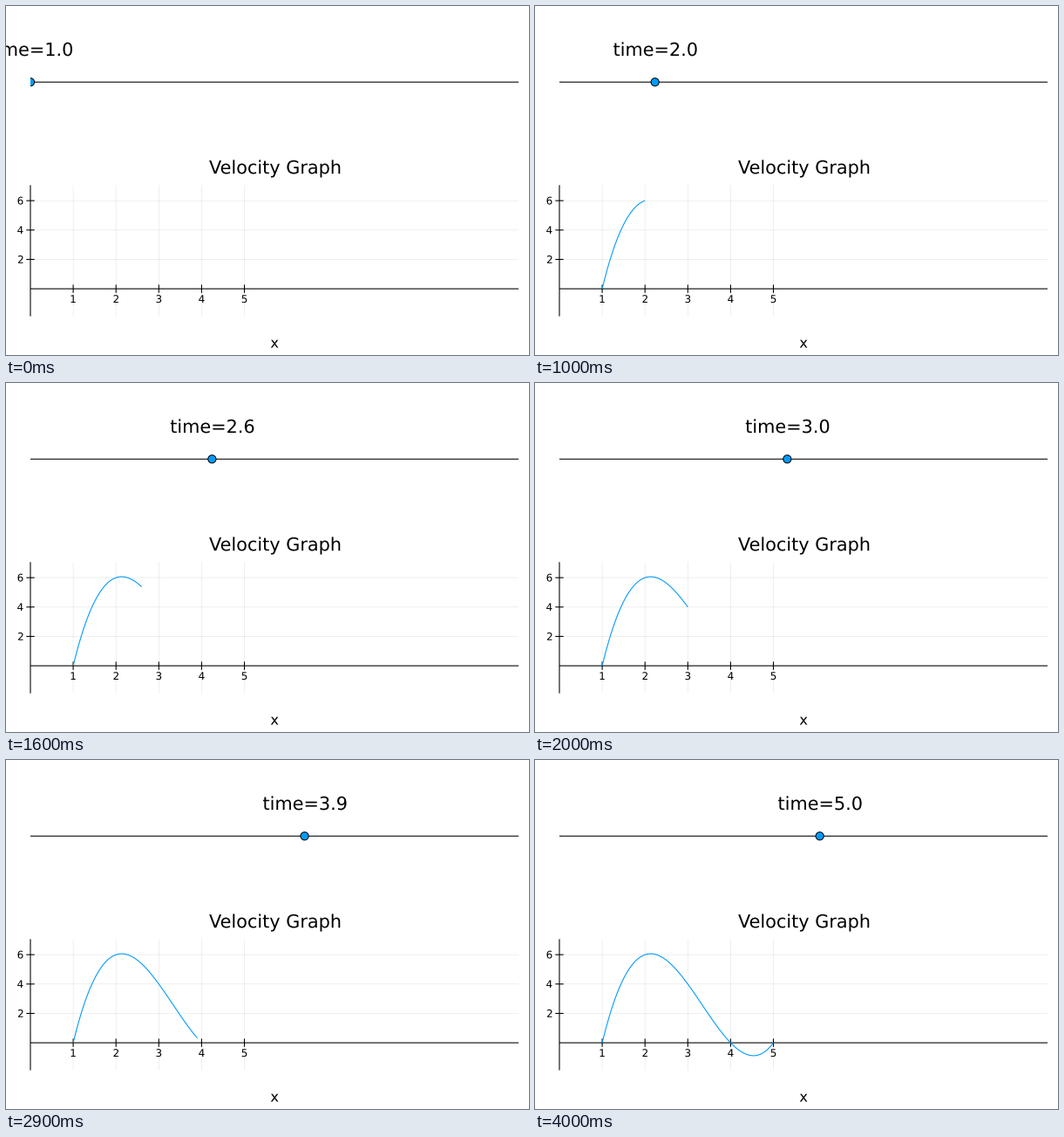
Write a matplotlib script that moves like this. It is 600 px wide and 400 px high and loops after 4100 ms.

```python
import numpy as np
import matplotlib.pyplot as plt
from matplotlib.animation import FuncAnimation
from matplotlib.patches import Circle, PathPatch, Rectangle
from matplotlib.textpath import TextPath
from matplotlib.transforms import Affine2D

WIDTH, HEIGHT, DPI = 600, 400, 100
STEPS, STEP_MS = 41, 100
PX = 72 / DPI                       # points per pixel
LEFT, RIGHT = 28, 588
TOP, BOTTOM = 205.3, 355.6
TRACK_Y, ZERO_Y = 87.2, 324.1
TRACK_UNIT = 28                     # pixels per unit of position
T_UNIT, V_UNIT = 49.1, 16.83        # pixels per unit of time and velocity
TITLE, LABEL, TICK = 20.8, 16.3, 11.9
TICK_HALF = 4.7
BLUE = "#009afa"

plt.rcParams["font.family"] = "DejaVu Sans"


def velocity(t):
    return (t - 1) * (t - 4) * (t - 5)


def position(t):
    def integral(u):
        return u**4 / 4 - 10 * u**3 / 3 + 29 * u**2 / 2 - 20 * u
    return integral(t) - integral(1)


fig = plt.figure(figsize=(WIDTH / DPI, HEIGHT / DPI), dpi=DPI, facecolor="white")
ax = fig.add_axes([0, 0, 1, 1])
ax.set_xlim(0, WIDTH)
ax.set_ylim(HEIGHT, 0)
ax.axis("off")


def segment(x0, y0, x1, y1, width=1.08, alpha=1.0, z=2):
    ax.plot([x0, x1], [y0, y1], color="black", lw=width * PX, alpha=alpha,
            solid_capstyle="butt", snap=False, zorder=z)


def grid(x0, y0, x1, y1):
    segment(x0, y0, x1, y1, width=0.6, alpha=0.1, z=1)


def text_path(text, x, baseline, size, align="center"):
    """Glyph outlines whose ink is centred on x, or ends there."""
    path = TextPath((0, 0), text, size=size)
    box = path.get_extents()
    anchor = box.x1 if align == "right" else (box.x0 + box.x1) / 2
    place = Affine2D().translate(-anchor, 0).scale(1, -1).translate(x, baseline)
    return place.transform_path(path)


def label(*args, **kwargs):
    patch = PathPatch(text_path(*args, **kwargs), fc="black", lw=0,
                      snap=False, zorder=5)
    return ax.add_patch(patch)


# Track
segment(LEFT, TRACK_Y, RIGHT, TRACK_Y)

# Velocity graph
for v in (2, 4, 6):
    y = ZERO_Y - v * V_UNIT
    grid(LEFT, y, RIGHT, y)
    segment(LEFT - TICK_HALF, y, LEFT + TICK_HALF, y)
    label(str(v), 19.5, y + 4.3, TICK, align="right")
for t in range(1, 6):
    x = LEFT + t * T_UNIT
    grid(x, TOP, x, BOTTOM)
    segment(x, ZERO_Y - TICK_HALF, x, ZERO_Y + TICK_HALF)
    label(str(t), x, 340, TICK)
segment(LEFT, ZERO_Y, RIGHT, ZERO_Y)
segment(LEFT, TOP, LEFT, BOTTOM)
label("Velocity Graph", 308.2, 192.2, TITLE)
label("x", 308.1, 391.6, LABEL)

# Moving parts
curve, = ax.plot([], [], color=BLUE, lw=1.08 * PX, solid_capstyle="butt",
                 snap=False, zorder=4)
caption = label("time=1.0", LEFT, 57.1, TITLE)
ball = Circle((LEFT, TRACK_Y), 4.6, fc=BLUE, ec="black", lw=PX, zorder=4)
ax.add_patch(ball)
ball.set_clip_path(Rectangle((LEFT, 0), RIGHT - LEFT, HEIGHT, transform=ax.transData))


def update(i):
    now = 1 + i / 10
    t = np.linspace(1, now, 4 * i + 1)
    curve.set_data(LEFT + t * T_UNIT, ZERO_Y - velocity(t) * V_UNIT)
    x = LEFT + position(now) * TRACK_UNIT
    ball.center = (x, TRACK_Y)
    caption.set_path(text_path(f"time={now:.1f}", x + 0.2, 57.1, TITLE))
    return curve, ball, caption


anim = FuncAnimation(fig, update, frames=STEPS, init_func=lambda: update(0),
                     interval=STEP_MS, repeat=True, repeat_delay=0)
plt.show()
```
